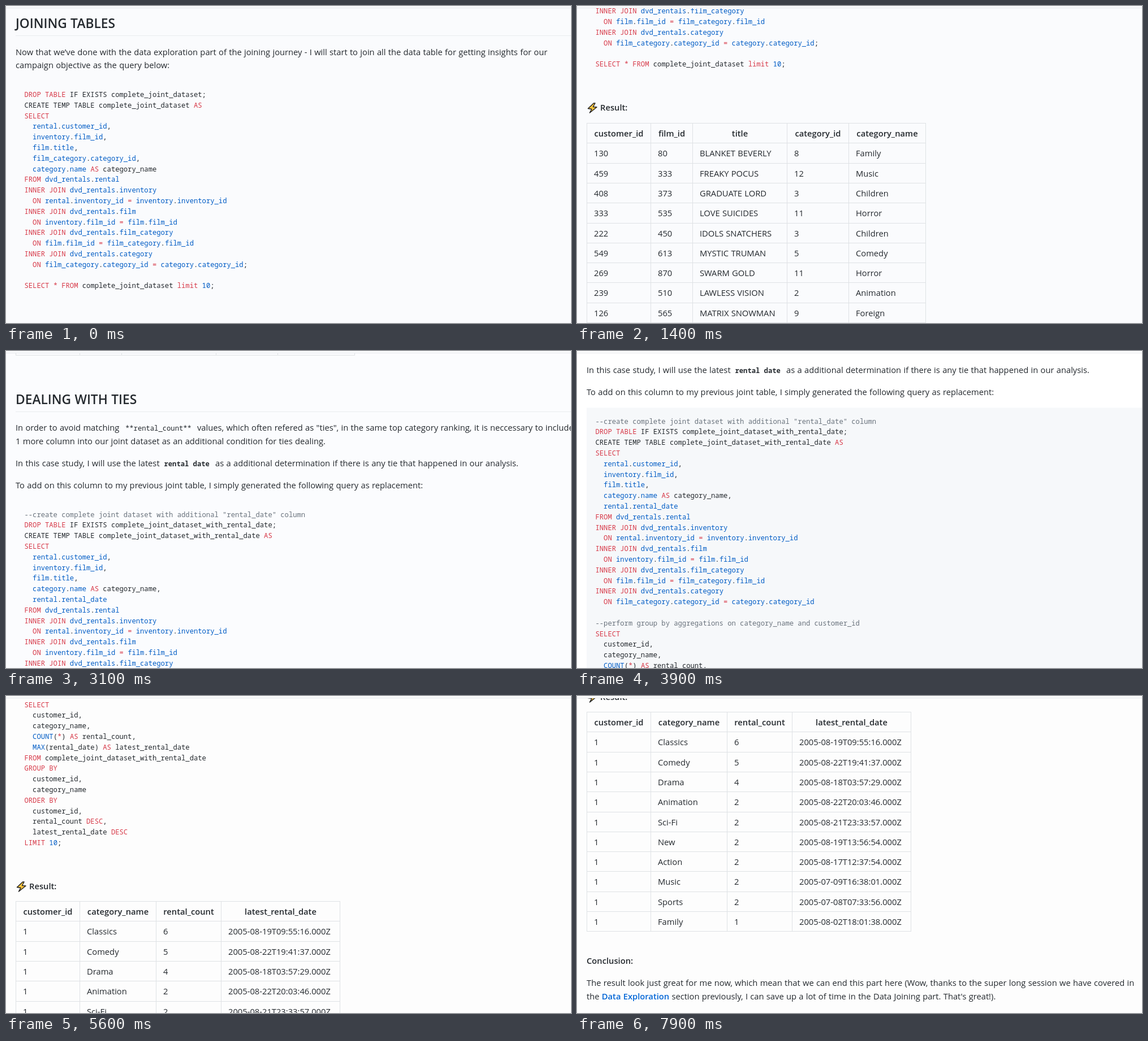
These frames come from a looping animation (999x561 px, 8 s). An HTML page:

```html
<!DOCTYPE html>
<html lang="en">
<head>
<meta charset="utf-8">
<style>
  html, body { margin: 0; width: 100%; height: 100%; overflow: hidden; }
  svg { display: block; width: 999px; height: 561px; }
  text { white-space: pre; fill: #24292e; font: 14.73px "Open Sans", "Noto Sans", sans-serif; word-spacing: .45px; }
  .b { font-weight: 600; }
  .h { font-size: 22.75px; font-weight: 600; }
  .c { font: 12.18px "Noto Sans Mono", monospace; word-spacing: 0; }
  .cb { font: 700 12.18px "Noto Sans Mono", monospace; word-spacing: 0; }
  .mid { text-anchor: middle; }
  .red { fill: #d73a49; }
  .blue { fill: #005cc5; }
  .note { fill: #6a737d; }
  .link { fill: #0366d6; font-weight: 600; }
  path { fill: none; stroke: #dfe2e5; }
</style>
</head>
<body>
<svg viewBox="0 0 999 561">
  <defs><clipPath id="view"><rect y="4" width="999" height="557"/></clipPath></defs>
  <rect id="paper" width="999" height="561"/>
  <g clip-path="url(#view)"><g id="page"></g></g>
  <path d="M0 3.5H999" style="stroke:#e6e8eb"/>
</svg>
<script>
const joins = last => `FROM dvd_rentals.rental
INNER JOIN dvd_rentals.inventory
  ON rental.inventory_id = inventory.inventory_id
INNER JOIN dvd_rentals.film
  ON inventory.film_id = film.film_id
INNER JOIN dvd_rentals.film_category
  ON film.film_id = film_category.film_id
INNER JOIN dvd_rentals.category
  ON film_category.category_id = category.category_id${last}`;

const joinQuery = `DROP TABLE IF EXISTS complete_joint_dataset;
CREATE TEMP TABLE complete_joint_dataset AS
SELECT
  rental.customer_id,
  inventory.film_id,
  film.title,
  film_category.category_id,
  category.name AS category_name
${joins(';')}

SELECT * FROM complete_joint_dataset limit 10;`;

const tieQuery = `--create complete joint dataset with additional "rental_date" column
DROP TABLE IF EXISTS complete_joint_dataset_with_rental_date;
CREATE TEMP TABLE complete_joint_dataset_with_rental_date AS
SELECT
  rental.customer_id,
  inventory.film_id,
  film.title,
  category.name AS category_name,
  rental.rental_date
${joins('')}

--perform group by aggregations on category_name and customer_id
SELECT
  customer_id,
  category_name,
  COUNT(*) AS rental_count,
  MAX(rental_date) AS latest_rental_date
FROM complete_joint_dataset_with_rental_date
GROUP BY
  customer_id,
  category_name
ORDER BY
  customer_id,
  rental_count DESC,
  latest_rental_date DESC
LIMIT 10;`;

const films = `customer_id|film_id|title|category_id|category_name
130|80|BLANKET BEVERLY|8|Family
459|333|FREAKY POCUS|12|Music
408|373|GRADUATE LORD|3|Children
333|535|LOVE SUICIDES|11|Horror
222|450|IDOLS SNATCHERS|3|Children
549|613|MYSTIC TRUMAN|5|Comedy
269|870|SWARM GOLD|11|Horror
239|510|LAWLESS VISION|2|Animation
126|565|MATRIX SNOWMAN|9|Foreign
399|396|HANGING DEEP|7|Drama`;

const counts = `customer_id|category_name|rental_count|latest_rental_date
1|Classics|6|2005-08-19T09:55:16.000Z
1|Comedy|5|2005-08-22T19:41:37.000Z
1|Drama|4|2005-08-18T03:57:29.000Z
1|Animation|2|2005-08-22T20:03:46.000Z
1|Sci-Fi|2|2005-08-21T23:33:57.000Z
1|New|2|2005-08-19T13:56:54.000Z
1|Action|2|2005-08-17T12:37:54.000Z
1|Music|2|2005-07-09T16:38:01.000Z
1|Sports|2|2005-07-08T07:33:56.000Z
1|Family|1|2005-08-02T18:01:38.000Z`;

const text = (x, y, str, cls = '') =>
  `<text x="${x}" y="${Math.round(y)}" class="${cls}">${str}</text>`;

const heading = (y, str) =>
  text(17, y, str, 'h') + `<path d="M17 ${y + 13.5}H999" style="stroke:#eaecef"/>`;

const tokens = /(DROP TABLE|\b(?:SELECT|FROM|INNER JOIN|ON|AS|GROUP BY|ORDER BY|DESC|LIMIT|limit)\b|[=*])|(\w+(?=\.)|(?<=\.)\w+|COUNT|MAX|\b10\b)/g;
const paint = line => line.startsWith('--')
  ? `<tspan class="note">${line}</tspan>`
  : line.replace(tokens, (word, key) => `<tspan class="${key ? 'red' : 'blue'}">${word}</tspan>`);

function code(y, query) {
  const lines = query.split('\n');
  return `<rect class="box" x="17" y="${y - 28}" width="982" height="${Math.round(lines.length * 18.8 + 31)}"/>`
    + lines.map((line, i) => text(32.5, y + i * 18.8, paint(line), 'c')).join('');
}

function table(top, edges, data) {
  const rows = data.split('\n'), at = i => top + Math.round(i * 35.3);
  let out = '', grid = '';
  for (let i = 0; i <= rows.length; i++) grid += `M${edges[0]} ${at(i) + .5}H${edges.at(-1) + 1}`;
  for (const x of edges) grid += `M${x + .5} ${top}V${at(rows.length) + 1}`;
  rows.forEach((row, i) => row.split('|').forEach((cell, j) => {
    out += i ? text(edges[j] + 13, at(i) + 24, cell)
             : text((edges[j] + edges[j + 1] + 1) / 2, at(i) + 24, cell, 'b mid');
  }));
  return `<path d="${grid}"/>` + out;
}

const result = y => `<path transform="translate(18 ${y - 14})" d="M11.5 1L1.5 10.5L8 11.5L4.5 18L17 8L10.5 7.5L14 1Z"
  style="fill:#ffc83d;stroke:#222;stroke-width:1.5;stroke-linejoin:round"/>` + text(41, y, 'Result:', 'b');

page.innerHTML = heading(39, 'JOINING TABLES')
  + text(17, 87, 'Now that we’ve done with the data exploration part of the joining journey - I will start to join all the data table for getting insights for our')
  + text(17, 110, 'campaign objective as the query below:')
  + code(161, joinQuery)
  + result(577)
  + table(599, [17, 130, 204, 371, 480, 616], films)
  + heading(1074, 'DEALING WITH TIES')
  + text(17, 1121, 'In order to avoid matching')
  + text(211, 1121, '**rental_count**', 'c')
  + text(338, 1121, 'values, which often refered as "ties", in the same top category ranking, it is neccessary to include')
  + text(17, 1145, '1 more column into our joint dataset as an additional condition for ties dealing.')
  + text(17, 1184, 'In this case study, I will use the latest')
  + text(279.5, 1184, 'rental date', 'cb')
  + text(370, 1184, 'as a additional determination if there is any tie that happened in our analysis.')
  + text(17, 1223, 'To add on this column to my previous joint table, I simply generated the following query as replacement:')
  + code(1273.5, tieQuery)
  + result(1972)
  + table(1993, [17, 130, 265, 380, 590], counts)
  + text(17, 2439, 'Conclusion:', 'b')
  + text(17, 2478, 'The result look just great for me now, which mean that we can end this part here (Wow, thanks to the super long session we have covered in')
  + text(17, 2502, 'the <tspan class="link">Data Exploration</tspan> section previously, I can save up a lot of time in the Data Joining part. That\'s great!).');

// Wheel scrolling, 98px per notch: [ms, offset]
const scroll = [
  [500, 0], [600, 30], [700, 86], [800, 98], [900, 121], [1300, 350], [1400, 392],
  [1600, 392], [1700, 460], [1800, 490], [1900, 490], [2000, 560], [2100, 650], [2200, 686],
  [2600, 686], [2700, 740], [3000, 955], [3100, 980], [3700, 980], [3800, 1050], [3900, 1145], [4000, 1176],
  [4100, 1176], [4200, 1274], [4700, 1274], [4800, 1338], [5000, 1525], [5100, 1568],
  [5500, 1568], [5600, 1630], [5800, 1745], [5900, 1764], [6400, 1764], [6500, 1840], [6600, 1862],
  [7000, 1862], [7100, 1900], [7200, 1945], [7300, 1960], [7800, 1960], [7900, 1965]
];

// [ms, paper, code box]
const tones = [
  [0, '#fafbfd', '#fafbfd'], [1700, '#fdfdfd', '#fdfdfd'], [2700, '#fbfcfe', '#fbfcfe'],
  [3800, '#ffffff', '#f6f8fa'], [5600, '#fdfdfd', '#fdfdfd']
];

function offset(t) {
  const i = scroll.findIndex(key => key[0] >= t);
  if (i < 1) return scroll[0][1];
  const [t0, y0] = scroll[i - 1], [t1, y1] = scroll[i];
  return Math.round(y0 + (y1 - y0) * (t - t0) / (t1 - t0));
}

const boxes = document.querySelectorAll('.box');
function draw(now) {
  const t = Math.floor(now % 8000 / 100) * 100;
  const [, back, box] = tones.findLast(tone => tone[0] <= t);
  paper.style.fill = back;
  boxes.forEach(el => el.style.fill = box);
  page.setAttribute('transform', `translate(0 ${-offset(t)})`);
  requestAnimationFrame(draw);
}
draw(0);
</script>
</body>
</html>
```
